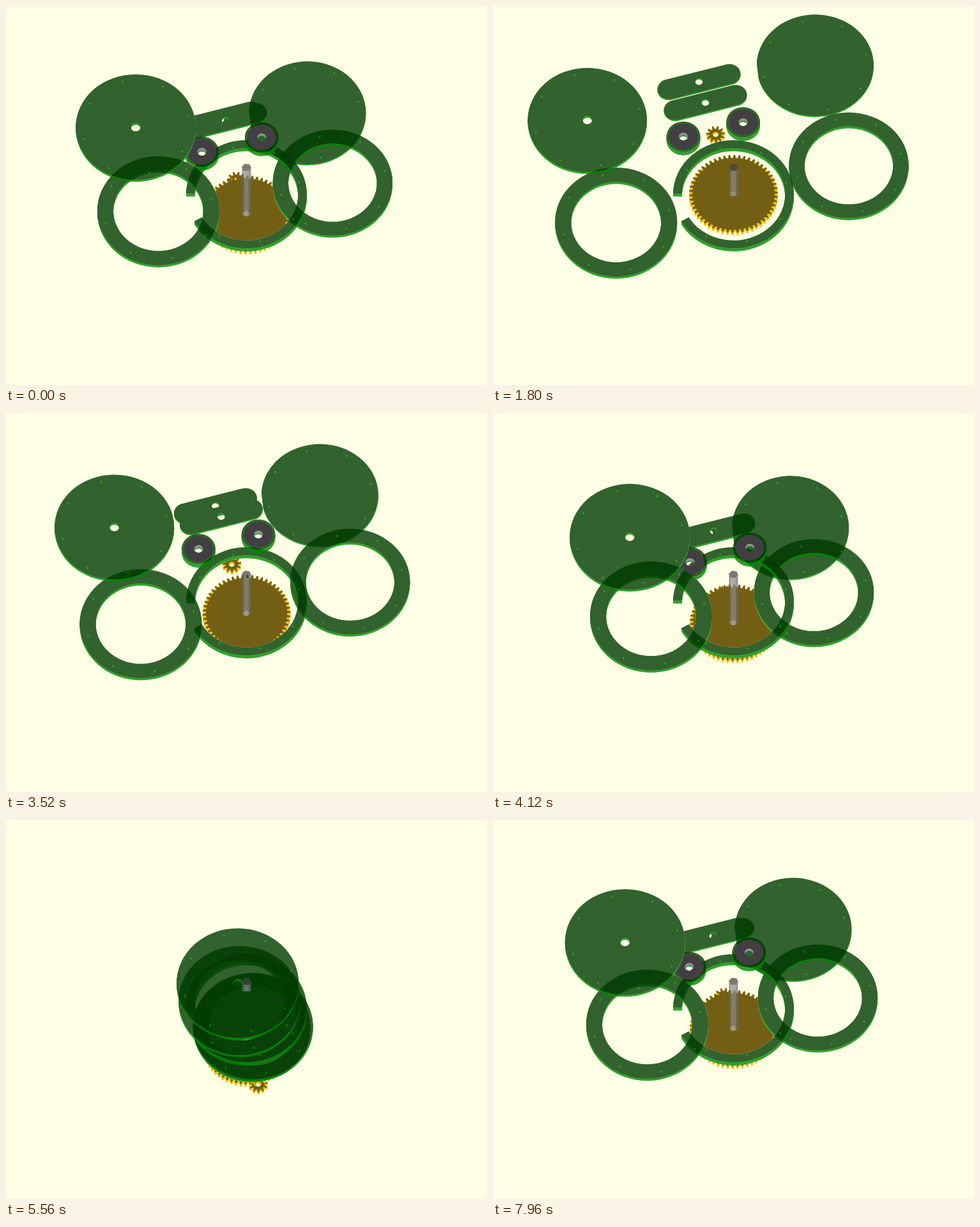
Animation of 753 by 593 pixels, one loop 8 s. Source, as an HTML page with a canvas:

```html
<!DOCTYPE html>
<html lang="en">
<head>
<meta charset="utf-8">
<title>Exploding gear assembly</title>
<style>
  html, body { margin: 0; width: 100%; height: 100%; overflow: hidden; background: #ffffe5; }
  canvas { display: block; }
</style>
</head>
<body>
<canvas id="stage" width="753" height="593"></canvas>
<script>
const W = 753, H = 593, LOOP = 8000, STEP = 40, RAD = Math.PI / 180;
const FACE = '#003b00', SIDE = '#008900', GLASS = 0.8;
const ctx = document.getElementById('stage').getContext('2d');
const buffer = document.createElement('canvas');
buffer.width = W;
buffer.height = H;
const layerCtx = buffer.getContext('2d');

// x: [base, w, w*w]; y: [base, w, s]; rx, ry: [base, w]; arc in degrees.
// s is the lift of the parts, w their distance left to the axis.
const plate = (x, y, rx, ry, t, inner = 0, arc = [0, 360]) =>
  ({ x, y, rx, ry, t, inner, arc });
const discL = plate([147.7, 54.8, 0.6], [160.7, 30.3, 19.4], [93.3, 0.6], [83, 1.1], 3, 0.08);
const ringL = plate([192.7, 45.7, 0.06], [333.6, -11.6, 6.2], [95.5, 0], [87, 0], 3.5, 0.738);
const discR = plate([504.4, -32.8, 0.3], [120, 48, -26.7], [91.5, 0], [80.3, 1.1], 2, 0, [183, 525]);
const ringR = plate([557, -45.8, 0.15], [266.8, 11.2, -16.1], [93.6, 0.1], [84.3, 0.2], 3.5, 0.741);
const ringC = plate([376.5, 0, 0], [297, 0, 0], [94.5, 0], [87, 0], 5, 0.855, [181, 510]);
const plates = [discR, ringR, ringC, ringL, discL];
const upper = [discL, ringL, ringR];

const arms = [
  { x: [322.5, 13.4, 0], y: [133, 45, -14] },
  { x: [332.5, 11, 0], y: [151.2, 28.8, 0.7] }
];
const rollers = [
  { x: [298, 8.7, 0], y: [199.2, 28.8, 5.1] },
  { x: [391.6, 8.7, 0], y: [176.7, 28.8, 5.1] }
];
const pinion = { x: [348.5, 12.3, 0], y: [232.5, 40, -32] };

function place(p, s, w) {
  p.cx = p.x[0] + p.x[1] * w + p.x[2] * w * w;
  p.cy = p.y[0] + p.y[1] * w + p.y[2] * s;
  if (p.rx) {
    p.cy -= p.t / 2;
    p.a = p.rx[0] + p.rx[1] * w;
    p.b = p.ry[0] + p.ry[1] * w - p.t / 2;
  }
}

// Extrudes a path downwards by t, then puts its face on top.
function solid(g, t, side, face, path) {
  const fill = (color, dy) => {
    g.beginPath();
    path(dy);
    g.fillStyle = color;
    g.fill('evenodd');
  };
  for (let dy = t; dy > 0; dy--) fill(side, dy);
  fill(face, 0);
}

function ringPath(g, x, y, a, b, inner, from = 0, to = 360) {
  g.ellipse(x, y, a, b, 0, from * RAD, to * RAD);
  if (inner) g.ellipse(x, y, a * inner, b * inner, 0, to * RAD, from * RAD, true);
  g.closePath();
}

function drawPlate(g, p) {
  solid(g, p.t, SIDE, FACE, dy => ringPath(g, p.cx, p.cy + dy, p.a, p.b, p.inner, ...p.arc));
  g.fillStyle = SIDE;
  for (let i = 0; i < 8; i++) {
    const q = (45 * i - 14.5) * RAD;
    if (p === ringC && i === 4) continue; // falls into the gap
    g.fillRect(p.cx + 0.895 * p.a * Math.cos(q) - 1, p.cy + 0.895 * p.b * Math.sin(q) - 1, 2.5, 3);
  }
}

function drawArm(g, p) {
  const tilt = Math.atan2(-13.6, 47.5);
  solid(g, 2, SIDE, FACE, dy => {
    g.save();
    g.translate(p.cx, p.cy - 1 + dy);
    g.scale(1, 0.88);
    g.rotate(tilt);
    g.arc(49.4, 0, 17.5, -Math.PI / 2, Math.PI / 2);
    g.arc(-49.4, 0, 17.5, Math.PI / 2, Math.PI * 1.5);
    g.closePath();
    g.moveTo(6, 0);
    g.arc(0, 0, 6, 0, Math.PI * 2);
    g.restore();
  });
}

const drawRollerBase = (g, p) =>
  solid(g, 6, SIDE, FACE, dy => ringPath(g, p.cx, p.cy + dy, 26.4, 23.5, 0.27));

function drawRollerTop(g, p) {
  solid(g, 4, '#929095', '#929095', dy => ringPath(g, p.cx, p.cy + dy, 11, 10, 0.64));
  solid(g, 0, '', '#413f42', () => ringPath(g, p.cx, p.cy, 22.5, 20, 0.31));
}

function drawGear(g, x, y, r, teeth, depth, t, hole) {
  solid(g, t, '#f5c20a', '#735f14', dy => {
    for (let i = 0; i < teeth * 4; i++) {
      const tip = i % 4 > 1;
      const q = ((i >> 2) + [0, 0.36, 0.54, 0.82][i % 4]) / teeth * Math.PI * 2;
      const k = tip ? r : r - depth;
      g.lineTo(x + k * Math.cos(q), y + dy + k * 0.875 * Math.sin(q));
    }
    g.closePath();
    if (hole) {
      g.moveTo(x + hole, y + dy);
      g.ellipse(x, y + dy, hole, hole * 0.88, 0, 0, Math.PI * 2);
    }
  });
}

function hexagon(g, x, y, a, b, color) {
  g.beginPath();
  for (let i = 0; i < 6; i++) {
    const q = (i * 60 + 10) * RAD;
    g.lineTo(x + a * Math.cos(q), y + b * Math.sin(q));
  }
  g.fillStyle = color;
  g.fill();
}

function shaftBody(g, top, bottom) {
  [[369.5, 3, '#666'], [372.5, 7.5, '#8a8a8a'], [380, 3.5, '#6c6c6c']].forEach(([x, w, color]) => {
    g.fillStyle = color;
    g.fillRect(x, top, w, Math.max(0, bottom - top));
  });
}

// Draws on its own layer, removes what lies behind the cullers, blends the rest in.
function layer(alpha, cullers, draw) {
  const g = layerCtx;
  g.globalCompositeOperation = 'source-over';
  g.clearRect(0, 0, W, H);
  draw(g);
  g.globalCompositeOperation = 'destination-out';
  cullers.forEach(p => drawPlate(g, p));
  ctx.globalAlpha = alpha;
  ctx.drawImage(buffer, 0, 0);
  ctx.globalAlpha = 1;
}

function render(ms) {
  const s = Math.sin(ms / LOOP * Math.PI * 2), w = (1 - s) ** 2;
  [...plates, ...arms, ...rollers, pinion].forEach(p => place(p, s, w));
  const gearY = 325 - 31.5 * s;
  const shaftEnd = gearY + 3;
  const stubEnd = Math.min(286.4 + 19.4 * s, shaftEnd);

  ctx.fillStyle = '#ffffe5';
  ctx.fillRect(0, 0, W, H);

  layer(1, plates, g => {
    drawGear(g, pinion.cx, pinion.cy, 15, 11, 5, 3, 4.5);
    drawGear(g, 376.5, gearY, 68.5 + 1.2 * s, 54, 5.5, 4, 0);
  });
  plates.forEach(p => layer(GLASS, [], g => drawPlate(g, p)));
  layer(GLASS, upper, g => arms.forEach(p => drawArm(g, p)));
  layer(GLASS, upper, g => rollers.forEach(p => drawRollerBase(g, p)));
  layer(1, upper, g => rollers.forEach(p => drawRollerTop(g, p)));

  layer(0.7, upper, g => {
    shaftBody(g, stubEnd, shaftEnd);
    hexagon(g, 376, gearY, 5, 4.5, '#b4b4ae');
  });
  layer(0.7, [], g => {
    shaftBody(g, 252, stubEnd);
    hexagon(g, 376.5, 252.5, 7.5, 6.2, '#424242');
  });
}

function frame(now) {
  render(Math.floor(now % LOOP / STEP) * STEP);
  requestAnimationFrame(frame);
}
requestAnimationFrame(frame);
</script>
</body>
</html>
```
